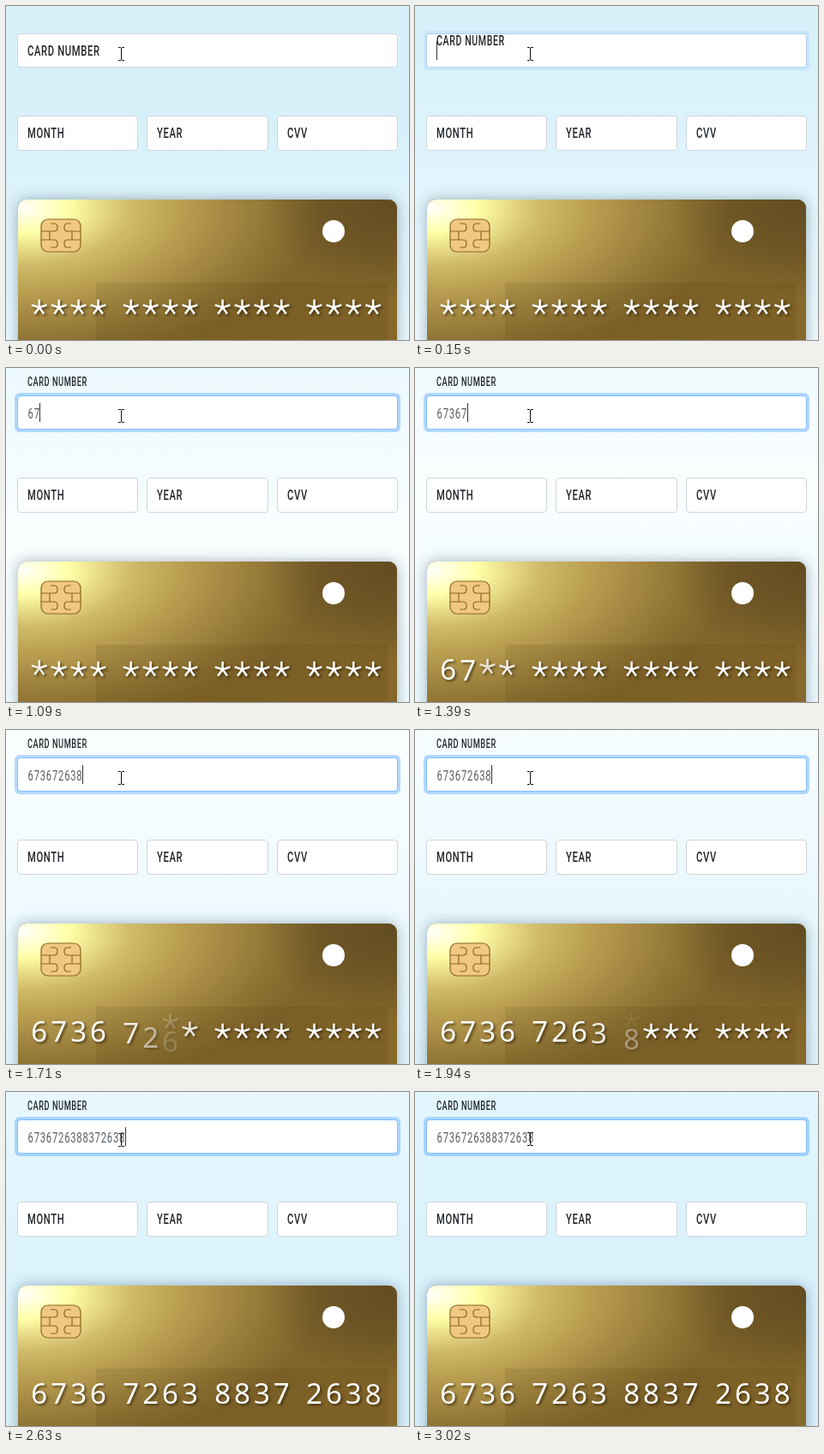
An HTML page with a canvas for the animation above (3.09 s loop, 470x390 px).

```html
<!DOCTYPE html>
<html lang="en">
<head>
<meta charset="utf-8">
<title>Card form</title>
<style>
html, body { margin: 0; width: 100%; height: 100%; overflow: hidden; background: #dbf2fc; }
canvas { display: block; }
</style>
</head>
<body>
<canvas id="stage" width="470" height="390"></canvas>
<script>
const ctx = document.getElementById('stage').getContext('2d');
const LOOP = 3090;
const NUMBER = '6736726388372638';
const KEY_TIMES = [1010, 1040, 1290, 1310, 1390, 1450, 1510, 1620,
  1705, 1950, 1995, 2060, 2190, 2215, 2260, 2290];
// Height of the brightest line of the background: [time, y]
const GLOW = [[0, 650], [620, 300], [1390, 140], [1710, 20], [2250, -150], [2630, -255], [3090, -355]];

const clamp = v => Math.max(0, Math.min(1, v));
const ease = v => { v = clamp(v); return v * v * (3 - 2 * v); };
const mix = (a, b, k) => a + (b - a) * k;

function track(points, t) {
  let i = 1;
  while (i < points.length - 1 && t > points[i][0]) i++;
  const [t0, a] = points[i - 1], [t1, b] = points[i];
  return mix(a, b, (t - t0) / (t1 - t0));
}

function box(x, y, w, h, r) {
  ctx.beginPath();
  ctx.roundRect(x, y, w, h, r);
}

// Fills the clipped area with an elliptic gradient
function glow(x, y, r, flat, stops) {
  const g = ctx.createRadialGradient(0, 0, 0, 0, 0, r);
  for (const [at, color] of stops) g.addColorStop(at, color);
  ctx.save();
  ctx.translate(x, y);
  ctx.scale(1, flat);
  ctx.fillStyle = g;
  ctx.fillRect(-1000, -1000, 2000, 2000);
  ctx.restore();
}

// Condensed face for the form
function formText(text, x, y, size, weight, color, spacing = 0.058) {
  ctx.save();
  ctx.translate(x, y);
  ctx.scale(0.66, 1);
  ctx.font = `${weight} ${size}px Roboto, sans-serif`;
  ctx.letterSpacing = `${size * spacing}px`;
  ctx.fillStyle = color;
  ctx.fillText(text, 0, 0);
  ctx.restore();
}

function background(t) {
  const peak = track(GLOW, t);
  const g = ctx.createLinearGradient(0, peak - 500, 0, peak + 500);
  g.addColorStop(0, '#d7f1fb');
  g.addColorStop(0.5, '#fafeff');
  g.addColorStop(1, '#d9f2fc');
  ctx.fillStyle = g;
  ctx.fillRect(0, 0, 470, 390);
}

function field(x, y, w, h, focus = 0) {
  if (focus) {
    box(x - 3, y - 3, w + 6, h + 6, 6);
    ctx.fillStyle = `rgba(0,123,255,${0.27 * focus})`;
    ctx.fill();
  }
  box(x + 0.5, y + 0.5, w - 1, h - 1, 3.5);
  ctx.fillStyle = '#fff';
  ctx.fill();
  ctx.lineWidth = 1;
  ctx.strokeStyle = `rgb(${mix(206, 128, focus)},${mix(212, 189, focus)},${mix(218, 255, focus)})`;
  ctx.stroke();
}

function form(t) {
  const focus = ease((t - 60) / 240);
  const typed = KEY_TIMES.filter(k => k <= t).length;
  const ink = '#23282d';

  field(13, 32, 444, 40, focus);
  formText('CARD NUMBER', 25, mix(58, 20.5, focus), mix(17, 14, focus), 500, ink);
  [['MONTH', 13, 141], ['YEAR', 164, 142], ['CVV', 316, 141]].forEach(([label, x, w]) => {
    field(x, 128, w, 41);
    formText(label, x + 12, 154, 17, 500, ink);
  });

  formText(NUMBER.slice(0, typed), 25.6, 59, 17, 400, '#565d64', 0.07);

  const blinkOn = t >= 80 && t < 620 || t >= 1010 && t < 2860;
  if (blinkOn) {
    ctx.fillStyle = '#333';
    ctx.fillRect(Math.floor(25.6 + typed * 7.1), 41, 1, 22);
  }
}

function chip() {
  box(41, 249, 46, 38, 8);
  ctx.fillStyle = '#f0c882';
  ctx.fill();
  ctx.strokeStyle = '#8c6724';
  ctx.lineWidth = 1.2;
  ctx.stroke();
  const corner = new Path2D('M-23-5H-8q4 0 4-4v-1q0-4-4-4h-4M-13-5V0');
  for (const sx of [-1, 1]) for (const sy of [-1, 1]) {
    ctx.save();
    ctx.translate(64, 268);
    ctx.scale(sx, sy);
    ctx.stroke(corner);
    ctx.restore();
  }
}

function card() {
  ctx.save();
  ctx.shadowColor = 'rgba(50,80,100,.45)';
  ctx.shadowBlur = 16;
  box(14, 226, 442, 280, 10);
  ctx.fillStyle = '#8a6c2c';
  ctx.fill();
  ctx.restore();

  ctx.save();
  box(14, 226, 442, 280, 10);
  ctx.clip();
  glow(18, 236, 460, 0.52, [
    [0, '#fffffa'], [0.05, '#ffffd8'], [0.12, '#ffffa8'], [0.2, '#e8db88'], [0.28, '#d0ba6a'],
    [0.4, '#bba052'], [0.52, '#a58943'], [0.64, '#8f7434'], [0.76, '#80642a'], [1, '#85682a']
  ]);
  glow(450, 235, 150, 0.7, [[0, 'rgba(85,65,30,.7)'], [0.5, 'rgba(85,65,30,.45)'], [1, 'rgba(85,65,30,0)']]);
  ctx.fillStyle = 'rgba(75,52,15,.12)';
  ctx.fillRect(105, 323, 340, 340);
  ctx.restore();

  chip();
  ctx.beginPath();
  ctx.arc(382, 263, 13, 0, 7);
  ctx.fillStyle = '#fff';
  ctx.fill();
}

function star(x, y) {
  ctx.beginPath();
  for (let i = 0; i < 5; i++) {
    const a = -Math.PI / 2 + i * Math.PI * 0.4;
    ctx.moveTo(x, y);
    ctx.lineTo(x + 9.3 * Math.cos(a), y + 9.3 * Math.sin(a));
  }
  ctx.stroke();
}

// Each star slides up and out, its digit follows from below
function cardNumber(t) {
  ctx.save();
  ctx.font = '33px "Noto Sans", "Open Sans", sans-serif';
  ctx.textAlign = 'center';
  ctx.fillStyle = ctx.strokeStyle = '#fff';
  ctx.lineWidth = 2.5;
  ctx.shadowColor = 'rgba(40,28,5,.65)';
  ctx.shadowBlur = 3;
  ctx.shadowOffsetX = ctx.shadowOffsetY = 2;
  [...NUMBER].forEach((digit, i) => {
    const x = 38.8 + Math.floor(i / 4) * 106.9 + i % 4 * 22.9;
    const age = t - KEY_TIMES[i] - 30;
    const out = ease(age / 250), into = ease((age - 100) / 250);
    if (out < 1) {
      ctx.globalAlpha = 1 - out;
      star(x, 352 - 15 * out);
    }
    if (into > 0) {
      ctx.globalAlpha = into;
      ctx.fillText(digit, x, 364 + 15 * (1 - into));
    }
  });
  ctx.restore();
}

function pointer(t) {
  const y = t < 3020 ? 48 : 47;
  ctx.fillStyle = '#111';
  ctx.fillRect(134, y + 1, 1, 14);
  for (const edge of [y, y + 15]) {
    ctx.fillRect(131, edge, 3, 1);
    ctx.fillRect(135, edge, 3, 1);
  }
}

function draw(now) {
  const t = now % LOOP;
  background(t);
  form(t);
  card();
  cardNumber(t);
  pointer(t);
}

const start = performance.now();
function tick() {
  draw(performance.now() - start);
  requestAnimationFrame(tick);
}
tick();
</script>
</body>
</html>
```
